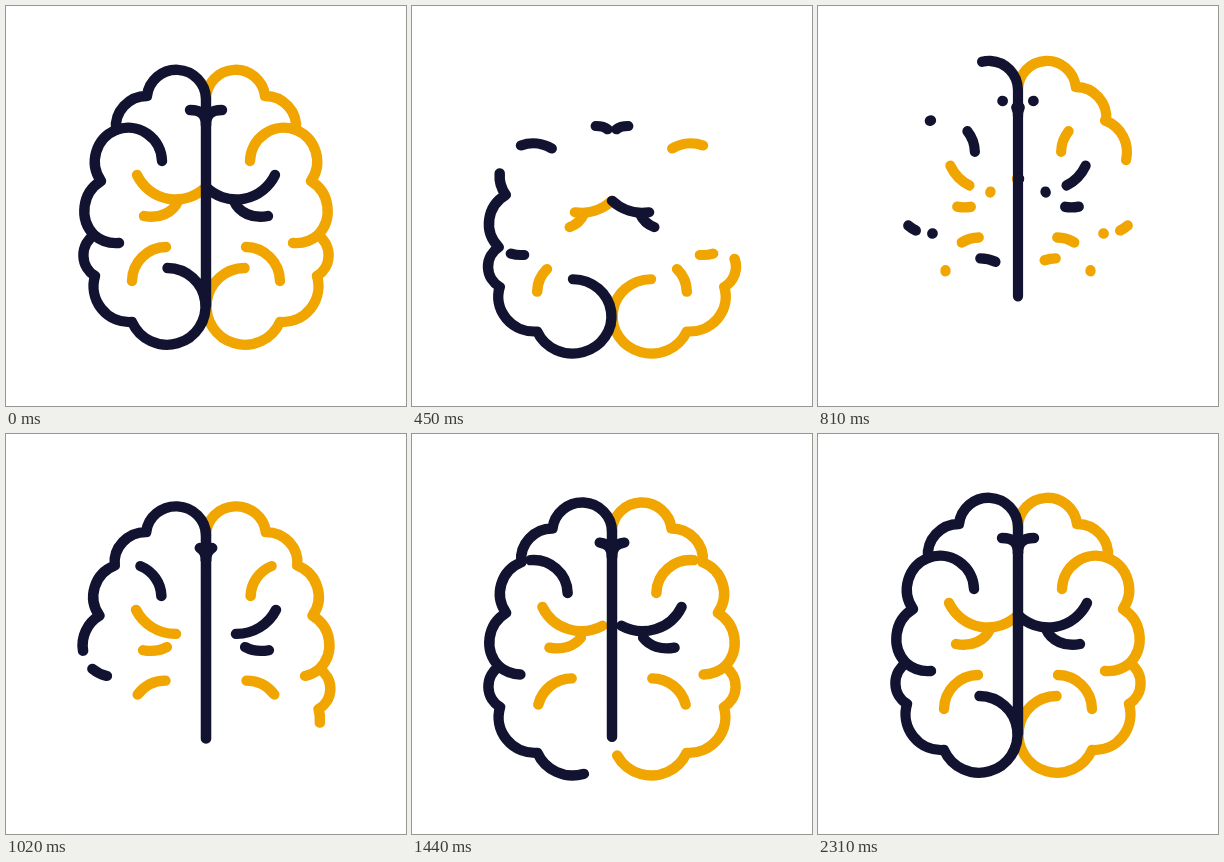
Recreate the animation shown at these times as an HTML page. Size 400 by 400 pixels, loop 4.46 s.

```html
<!DOCTYPE html>
<html lang="en">
<head>
<meta charset="utf-8">
<title>Brain</title>
<style>
  html, body { margin: 0; width: 100%; height: 100%; overflow: hidden; background: #fff; }
  svg { display: block; width: 100vw; height: 100vh; }
  path { fill: none; stroke-width: 10.4; stroke-linecap: round; stroke-linejoin: round; }
</style>
</head>
<body>
<svg viewBox="0 0 400 400"><g id="brain"></g></svg>
<script>
const LOOP = 4460, REST = 2310, ERASE_END = 888, DRAW_START = 510, DRAW_END = 2360;
const NAVY = '#121331', GOLD = '#f0a500';
const brain = document.getElementById('brain');

// Shapes of the left half; the right half is mirrored.
const rim = 'A29.6 29.6 0 0 0 141 90 A31 31 0 0 0 110 124 A34 34 0 0 0 95 175' +
  'A35 35 0 0 0 88 229 A24.5 24.5 0 0 0 89 270 A36 36 0 0 0 126 316' +
  'A38.4 38.4 0 1 0 161.5 262';
const shape = {
  rim: 'M200 93' + rim,
  stemRim: 'M200 300 V93' + rim,
  lobe: 'M156 155 A34 34 0 0 0 110 124',
  fold: 'M88 229 A34 34 0 0 0 113 237',
  arc: 'M131 169 A43 43 0 0 0 200 181',
  twig: 'M138 210 C153 213 167 207 172 195',
  curl: 'M160 241 A34.5 34.5 0 0 0 126 275',
  arm: 'M200 119 C200 109 195 104 184 104'
};

// name, colour, mirrored
const parts = [
  ['rim', GOLD, 1], ['lobe', GOLD, 1], ['fold', GOLD, 1],
  ['arc', GOLD, 0], ['twig', GOLD, 0], ['curl', GOLD, 0], ['curl', GOLD, 1],
  ['stemRim', NAVY, 0], ['lobe', NAVY, 0], ['fold', NAVY, 0],
  ['arc', NAVY, 1], ['twig', NAVY, 1], ['arm', NAVY, 0], ['arm', NAVY, 1]
];

function addPath([name, colour, mirrored]) {
  const p = document.createElementNS('http://www.w3.org/2000/svg', 'path');
  p.setAttribute('d', shape[name]);
  p.setAttribute('stroke', colour);
  p.setAttribute('pathLength', 1);
  if (mirrored) p.setAttribute('transform', 'matrix(-1 0 0 1 400 0)');
  brain.appendChild(p);
  return p;
}
const lines = parts.map(part => ({ fading: addPath(part), growing: addPath(part) }));

// time, vertical shift, width scale, height scale
const poses = [
  [0, 0, 1, 1],
  [285, 22, 1.035, 0.951],
  [690, -14, 0.97, 1],
  [1110, 6.5, 1.02, 0.982],
  [1700, 0, 1, 1],
  [LOOP, 0, 1, 1]
];

const clamp = v => Math.min(1, Math.max(0, v));
const smooth = v => v * v * (3 - 2 * v);

// Cubic bezier easing (.167, 0, .1, 1)
function easeOut(x) {
  let lo = 0, hi = 1;
  for (let i = 0; i < 24; i++) {
    const s = (lo + hi) / 2, r = 1 - s;
    const at = 3 * r * r * s * 0.167 + 3 * r * s * s * 0.1 + s * s * s;
    if (at < x) lo = s; else hi = s;
  }
  return smooth((lo + hi) / 2);
}

function poseAt(t) {
  const i = poses.findIndex(p => p[0] > t);
  const a = poses[i - 1], b = poses[i];
  const k = smooth((t - a[0]) / (b[0] - a[0]));
  return a.map((v, j) => v + (b[j] - v) * k);
}

function trim(path, visible, dash, offset) {
  path.style.visibility = visible ? 'visible' : 'hidden';
  path.style.strokeDasharray = dash;
  path.style.strokeDashoffset = offset;
}

function render(t) {
  const gone = smooth(clamp(t / ERASE_END));
  const drawn = t >= REST ? 1 : easeOut(clamp((t - DRAW_START) / (DRAW_END - DRAW_START)));
  for (const { fading, growing } of lines) {
    trim(fading, gone < 1, '2 2', -gone);
    trim(growing, t > DRAW_START, drawn === 1 ? 'none' : drawn + ' 2', 0);
  }
  const [, dy, sx, sy] = poseAt(t);
  brain.setAttribute('transform',
    `translate(200 ${338 + dy}) scale(${sx} ${sy}) translate(-200 -338)`);
}

const start = performance.now();
function tick() {
  render((performance.now() - start) % LOOP);
  requestAnimationFrame(tick);
}
tick();
</script>
</body>
</html>
```
